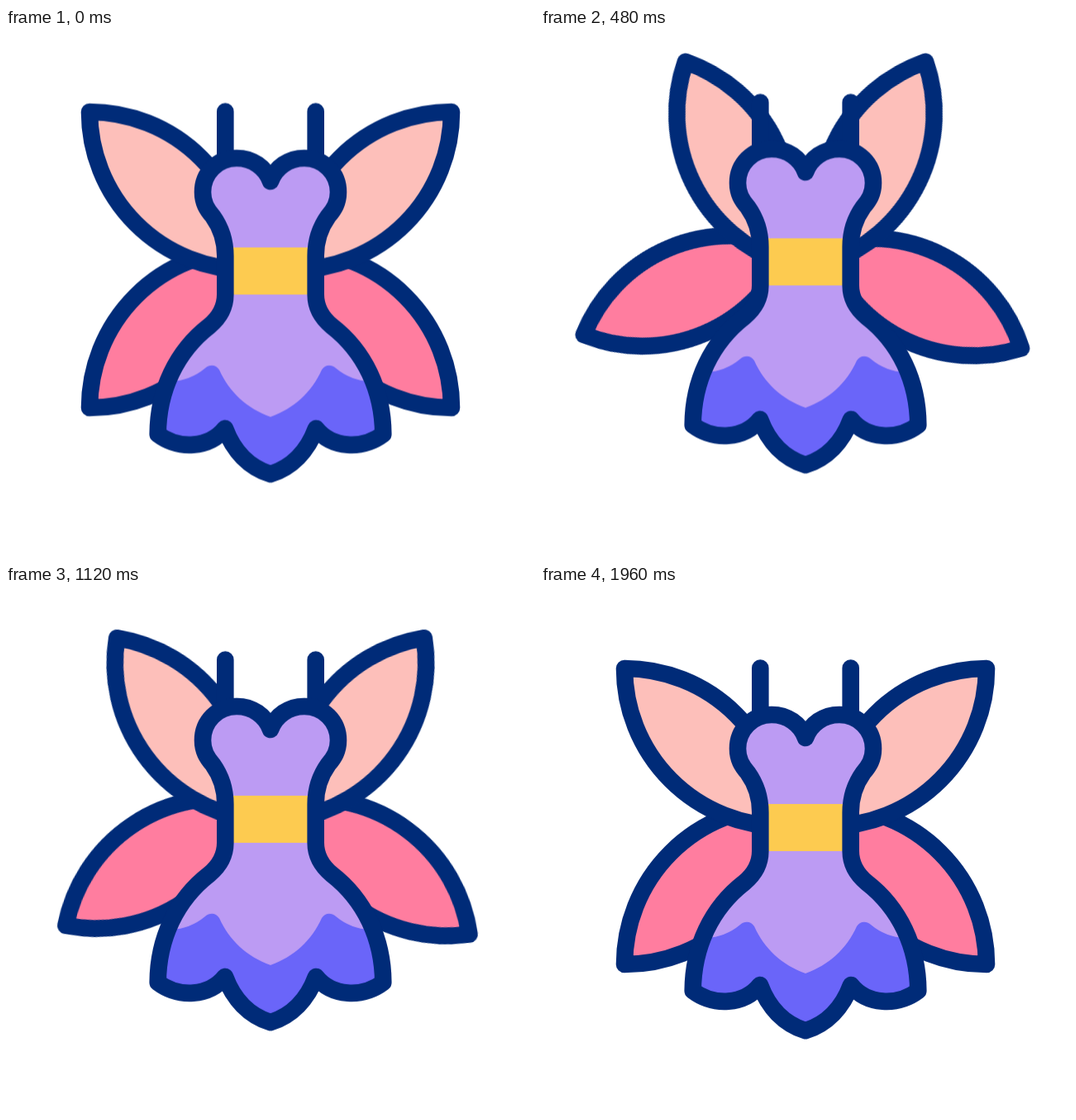
These frames come from a looping animation (640 px wide and 640 px high, 2 s). An HTML page:

```html
<!DOCTYPE html>
<html lang="en">
<head>
<meta charset="utf-8">
<title>Fairy dress</title>
<style>
  html, body { margin: 0; width: 100%; height: 100%; overflow: hidden; background: #fff; }
  svg { display: block; width: 100%; height: 100%; }

  .fairy, .wing {
    animation: 2s cubic-bezier(.3333, 0, .6667, 1) infinite;
  }
  .fairy { animation-name: bob; }
  .wing { animation-name: flap; }
  .upper { --up: 28.5deg; transform-origin: 285px 295px; fill: #fdbfba; }
  .lower { --up: 32deg; transform-origin: 276px 293px; fill: #ff7d9f; }
  .right .lower { --up: 26.6deg; }
  .line { stroke: #002b78; stroke-width: 20.6; stroke-linecap: round; stroke-linejoin: round; }

  @keyframes bob {
    0%, 100% { transform: translateY(0); }
    15% { transform: translateY(56px); }
    30% { transform: translateY(-46px); }
    44.6% { transform: translateY(34px); }
    60% { transform: translateY(-18.8px); }
    75% { transform: translateY(3.5px); }
    90% { transform: translateY(-.8px); }
  }
  @keyframes flap {
    0%, 4% { transform: rotate(0deg); }
    20% { transform: rotate(var(--up)); }
    33.6% { transform: rotate(-15.3deg); }
    49% { transform: rotate(var(--up)); }
    64.4% { transform: rotate(-15.8deg); }
    85%, 100% { transform: rotate(0deg); }
  }
</style>
</head>
<body>
<svg viewBox="0 0 640 640">
  <defs>
    <path id="dress" d="M320 185
      C314 168 298 157 279 157 C256 157 238 175 238 198
      C238 211 243 219 250 227 C260 241 265.3 257 265.3 275 V322
      C265.3 338 258 350 246 360 C206 391 184 438 183.7 491
      C209 510 246 508 265 484 C275 511 294 531 320 539.3
      C346 531 365 511 375 484 C394 508 431 510 456.3 491
      C456 438 434 391 394 360 C382 350 374.7 338 374.7 322 V275
      C374.7 257 380 241 390 227 C397 219 402 211 402 198
      C402 175 384 157 361 157 C342 157 326 168 320 185 Z"/>
    <clipPath id="inside"><use href="#dress"/></clipPath>
  </defs>

  <g class="fairy">
    <g class="line">
      <g>
        <path class="wing lower" d="M101 459 A191 191 0 0 1 292 268 A191 191 0 0 1 101 459 Z"/>
        <path class="wing upper" d="M101 101 A191 191 0 0 1 292 292 A191 191 0 0 1 101 101 Z"/>
      </g>
      <g class="right" transform="matrix(-1 0 0 1 640 0)">
        <path class="wing lower" d="M101 459 A191 191 0 0 1 292 268 A191 191 0 0 1 101 459 Z"/>
        <path class="wing upper" d="M101 101 A191 191 0 0 1 292 292 A191 191 0 0 1 101 101 Z"/>
      </g>
      <path d="M265.3 100.5 V170 M374.7 100.5 V170"/>
    </g>

    <use href="#dress" fill="#bc9bf3"/>
    <g clip-path="url(#inside)">
      <path fill="#fdcb50" d="M255 265 H385 V322 H255 Z"/>
      <path fill="#6a65f9" d="M180 427 H200 Q223 426 241 411
        C247 406 254 407 258 413 C270 440 292 460 320 470
        C348 460 370 440 382 413 C386 407 393 406 399 411
        Q417 426 440 427 H460 V560 H180 Z"/>
    </g>
    <use href="#dress" class="line" fill="none"/>
  </g>
</svg>
</body>
</html>
```
